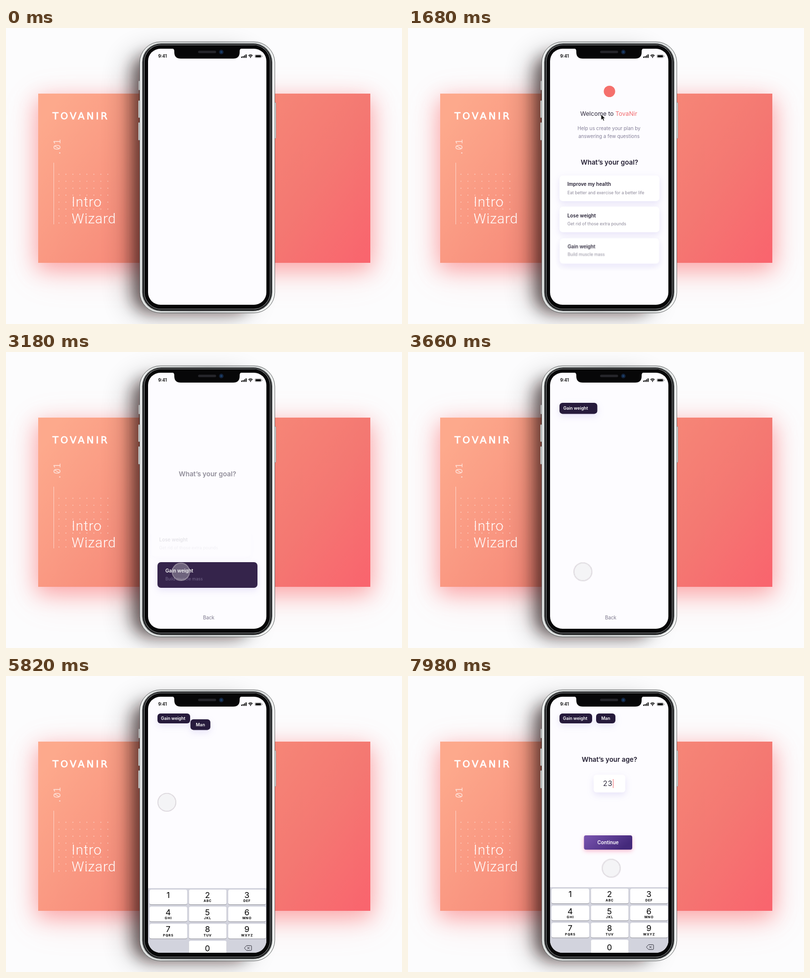
An HTML page that plays this animation: 800 px wide and 600 px high, repeating every 8 s.

```html
<!DOCTYPE html>
<html lang="en">
<head>
<meta charset="utf-8">
<title>Intro Wizard</title>
<style>
html, body { margin: 0; width: 100%; height: 100%; overflow: hidden; background: #fcfcfd; }
svg { display: block; width: 100%; height: 100%; }
text { font-family: Inter, Roboto, sans-serif; }
.mid { text-anchor: middle; }
.head { font-size: 13.4px; font-weight: 600; fill: #241f33; }
.bold { font-size: 9.85px; font-weight: 600; fill: #241f33; }
.sub { font-size: 8.6px; fill: #8b8798; }
.help { font-size: 9.8px; fill: #86819a; }
.box { fill: #fff; filter: drop-shadow(0 5px 7px rgba(105, 85, 210, .15)); }
.pop { transform-box: fill-box; transform-origin: center; }

.anim * { animation: 8s linear infinite both; }

/* welcome */
.anim .icon { animation-name: icon; }
.anim .welcome { animation-name: welcome; }
.anim .help { animation-name: help; }
.anim .goal { animation-name: goal; }
.anim .card1 { animation-name: card1; }
.anim .card2 { animation-name: card2; }
.anim .card3 { animation-name: card3; }
@keyframes icon {
  0%, 1.1% { opacity: 0; transform: scale(.6); animation-timing-function: ease-out; }
  6.2%, 34.5% { opacity: 1; transform: none; }
  37.5%, 100% { opacity: 0; transform: translateY(-14px); }
}
@keyframes welcome {
  0%, 3.1% { opacity: 0; transform: translateY(12px); animation-timing-function: ease-out; }
  8.8%, 34.7% { opacity: 1; transform: none; }
  38%, 100% { opacity: 0; transform: translateY(-14px); }
}
@keyframes help {
  0%, 5% { opacity: 0; transform: translateY(12px); animation-timing-function: ease-out; }
  10.8%, 35% { opacity: 1; transform: none; }
  38.4%, 100% { opacity: 0; transform: translateY(-14px); }
}
@keyframes goal {
  0%, 11.2% { opacity: 0; transform: translateY(12px); animation-timing-function: ease-out; }
  15.6%, 36.5% { opacity: 1; transform: none; animation-timing-function: ease-in-out; }
  43%, 100% { opacity: 0; transform: translateY(-50px); }
}
@keyframes card1 {
  0%, 12.8% { opacity: 0; transform: scale(.9); animation-timing-function: ease-out; }
  17.5%, 35% { opacity: 1; transform: none; }
  38.8%, 100% { opacity: 0; transform: translateX(-15px); }
}
@keyframes card2 {
  0%, 14.8% { opacity: 0; transform: scale(.9); animation-timing-function: ease-out; }
  19.5%, 36.3% { opacity: 1; transform: none; }
  40.2%, 100% { opacity: 0; transform: translateX(-14px); }
}
@keyframes card3 {
  0%, 16.8% { opacity: 0; transform: scale(.9); animation-timing-function: ease-out; }
  22%, 100% { opacity: 1; transform: none; }
}

/* chosen goal shrinks to a chip */
.anim .gain-box { animation-name: gain-box; }
.anim .gain-title { animation-name: gain-title; }
.anim .gain-sub { animation-name: gain-sub; }
.anim .back { animation-name: back; }
@keyframes gain-box {
  0%, 34.8% { x: 306px; y: 426px; width: 202px; height: 52px; rx: 7px; fill: #fff; }
  37.5%, 40% { x: 306px; y: 426px; width: 202px; height: 52px; rx: 7px; fill: #35244b; animation-timing-function: cubic-bezier(.5, 0, .2, 1); }
  48.5%, 100% { x: 306px; y: 76px; width: 66px; height: 20px; rx: 6px; fill: #261a3b; }
}
@keyframes gain-title {
  0%, 34.8% { transform: translate(322px, 446.5px) scale(1); fill: #241f33; }
  37.5%, 40% { transform: translate(322px, 446.5px) scale(1); fill: #fff; animation-timing-function: cubic-bezier(.5, 0, .2, 1); }
  48.5%, 100% { transform: translate(313px, 89px) scale(.877); fill: #fff; }
}
@keyframes gain-sub {
  0%, 34.8% { opacity: 1; fill: #8b8798; }
  37.5%, 40% { opacity: 1; fill: #75698c; }
  41.6%, 100% { opacity: 0; fill: #75698c; }
}
@keyframes back {
  0%, 36% { opacity: 0; }
  39%, 64.5% { opacity: 1; }
  67%, 100% { opacity: 0; }
}

/* gender */
.anim .ima { animation-name: ima; }
.anim .man { animation-name: man; }
.anim .woman { animation-name: woman; }
.anim .other { animation-name: other; }
.anim .man-box { animation-name: man-box; }
.anim .man-title { animation-name: man-title; }
@keyframes ima {
  0%, 47.2% { opacity: 0; transform: translateY(14px); animation-timing-function: ease-out; }
  51.5%, 64.2% { opacity: 1; transform: none; }
  68%, 100% { opacity: 0; transform: translateY(-18px); }
}
@keyframes man {
  0%, 48% { opacity: 0; transform: scale(.85); animation-timing-function: ease-out; }
  52%, 100% { opacity: 1; transform: none; }
}
@keyframes woman {
  0%, 49% { opacity: 0; transform: scale(.85); animation-timing-function: ease-out; }
  53%, 64.2% { opacity: 1; transform: none; }
  67.6%, 100% { opacity: 0; transform: translateX(-10px); }
}
@keyframes other {
  0%, 50% { opacity: 0; transform: scale(.85); animation-timing-function: ease-out; }
  54%, 64.8% { opacity: 1; transform: none; }
  68.3%, 100% { opacity: 0; transform: translateX(-10px); }
}
@keyframes man-box {
  0%, 63.4% { x: 303px; y: 199px; width: 52px; height: 37px; rx: 7px; fill: #fff; }
  65.5%, 66.9% { x: 303px; y: 199px; width: 52px; height: 37px; rx: 7px; fill: #35244b; animation-timing-function: cubic-bezier(.45, 0, .3, 1); }
  75.5%, 100% { x: 380px; y: 76px; width: 39px; height: 20px; rx: 6px; fill: #261a3b; }
}
@keyframes man-title {
  0%, 63.4% { transform: translate(329px, 220.7px) scale(1); fill: #241f33; }
  65.5%, 66.9% { transform: translate(329px, 220.7px) scale(1); fill: #fff; animation-timing-function: cubic-bezier(.45, 0, .3, 1); }
  75.5%, 100% { transform: translate(399.5px, 89px) scale(.877); fill: #fff; }
}

/* age */
.anim .keys { animation-name: keys; }
.anim .age { animation-name: age; }
.anim .field { animation-name: field; }
.anim .hint { animation-name: hint; }
.anim .two { animation-name: two; }
.anim .three { animation-name: three; }
.anim .caret { animation-name: caret; }
.anim .next { animation-name: next; }
@keyframes keys {
  0%, 64.5% { transform: translateY(138px); animation-timing-function: cubic-bezier(.3, 0, .1, 1); }
  74.5%, 100% { transform: none; }
}
@keyframes age {
  0%, 77% { opacity: 0; transform: translateY(14px); animation-timing-function: ease-out; }
  81.5%, 100% { opacity: 1; transform: none; }
}
@keyframes field {
  0%, 83% { opacity: 0; transform: translateY(2px) scale(.86); }
  88%, 100% { opacity: 1; transform: none; }
}
@keyframes hint { 0%, 89.39% { opacity: 1; } 89.4%, 100% { opacity: 0; } }
@keyframes two { 0%, 89.39% { opacity: 0; } 89.4%, 100% { opacity: 1; } }
@keyframes three { 0%, 94.09% { opacity: 0; } 94.1%, 100% { opacity: 1; } }
@keyframes caret {
  0%, 89.39% { opacity: 0; transform: translateX(-10px); }
  89.4%, 94.09% { opacity: 1; transform: translateX(-10px); }
  94.1%, 100% { opacity: 1; transform: none; }
}
@keyframes next {
  0%, 94.5% { opacity: 0; transform: translateY(10px); animation-timing-function: ease-out; }
  98.5%, 100% { opacity: 1; transform: none; }
}

/* pointer */
.anim .arrow { animation-name: arrow; }
.anim .touch { animation-name: touch; }
.anim .tx { animation-name: tx; }
.anim .ty { animation-name: ty; }
.anim .press { animation-name: press; }
@keyframes arrow {
  0%, 1.1% { transform: translate(274px, 44px); opacity: 1; animation-timing-function: cubic-bezier(.4, 0, .2, 1); }
  10%, 21.2% { transform: translate(390px, 175px); opacity: 1; animation-timing-function: cubic-bezier(.6, 0, .2, 1); }
  32%, 34% { transform: translate(352px, 444px); opacity: 1; }
  35%, 100% { transform: translate(352px, 444px); opacity: 0; }
}
@keyframes touch { 0%, 34.2% { opacity: 0; } 35.6%, 81.5% { opacity: 1; } 84%, 86% { opacity: .75; } 88%, 100% { opacity: 1; } }
@keyframes tx {
  0%, 58.1% { transform: translateX(353.3px); animation-timing-function: cubic-bezier(.65, 0, .35, 1); }
  63.1%, 66% { transform: translateX(329px); animation-timing-function: ease-in-out; }
  72%, 81.5% { transform: translateX(325px); animation-timing-function: cubic-bezier(.45, 0, .25, 1); }
  86.3%, 90.5% { transform: translateX(407px); animation-timing-function: ease-in-out; }
  93.4%, 95.6% { transform: translateX(460px); animation-timing-function: cubic-bezier(.5, 0, .65, .9); }
  100% { transform: translateX(410px); }
}
@keyframes ty {
  0%, 58.1% { transform: translateY(445.5px); animation-timing-function: cubic-bezier(.65, 0, .35, 1); }
  63.1%, 66% { transform: translateY(217px); animation-timing-function: ease-in-out; }
  72%, 81.5% { transform: translateY(256px); animation-timing-function: cubic-bezier(.65, 0, .35, 1); }
  86.3%, 95.6% { transform: translateY(443px); animation-timing-function: cubic-bezier(.5, 0, .65, .9); }
  100% { transform: translateY(389px); }
}
@keyframes press {
  0%, 34.2% { transform: scale(.5); }
  36%, 39.7% { transform: scale(.96); }
  43%, 63% { transform: none; }
  64% { transform: scale(.8); }
  65.5%, 88.4% { transform: none; }
  89.4% { transform: scale(.8); }
  90.4%, 93.4% { transform: none; }
  94.2% { transform: scale(.8); }
  95.2%, 100% { transform: none; }
}
</style>
</head>
<body>
<svg viewBox="0 0 800 600">
  <defs>
    <linearGradient id="coral" gradientUnits="userSpaceOnUse" x1="130" y1="110" x2="690" y2="515">
      <stop offset="0" stop-color="#fda98c"/><stop offset=".5" stop-color="#f68677"/><stop offset=".75" stop-color="#f47872"/><stop offset="1" stop-color="#f9656e"/>
    </linearGradient>
    <linearGradient id="steel" x2="1" y2=".1">
      <stop offset="0" stop-color="#f4f6f5"/><stop offset=".08" stop-color="#e3e6e5"/><stop offset=".5" stop-color="#c9cccc"/>
      <stop offset=".92" stop-color="#dfe2e2"/><stop offset="1" stop-color="#f4f6f5"/>
    </linearGradient>
    <linearGradient id="violet" x2="1" y2=".4">
      <stop offset="0" stop-color="#7a55b0"/><stop offset="1" stop-color="#44297b"/>
    </linearGradient>
    <filter id="glow" x="-25%" y="-50%" width="150%" height="200%"><feGaussianBlur stdDeviation="22"/></filter>
    <filter id="haze" x="-25%" y="-60%" width="150%" height="220%"><feGaussianBlur stdDeviation="36"/></filter>
    <filter id="shade" x="-40%" y="-20%" width="180%" height="140%"><feGaussianBlur stdDeviation="15"/></filter>
    <filter id="gloom" x="-60%" y="-30%" width="220%" height="160%"><feGaussianBlur stdDeviation="28"/></filter>
    <clipPath id="screen"><rect x="287" y="42" width="239" height="519" rx="25"/></clipPath>
  </defs>

  <rect width="800" height="600" fill="#fcfcfd"/>
  <rect x="65" y="152" width="671" height="343" fill="#fb8583" opacity=".26" filter="url(#haze)"/>
  <rect x="62" y="144" width="677" height="345" fill="#fb7479" opacity=".56" filter="url(#glow)"/>
  <rect x="65" y="133" width="671" height="343" fill="url(#coral)"/>
  <rect x="246" y="50" width="250" height="530" rx="40" fill="#180a08" opacity=".24" filter="url(#gloom)"/>
  <rect x="256" y="54" width="240" height="522" rx="36" fill="#180604" opacity=".56" filter="url(#shade)"/>

  <g fill="#fff">
    <text x="94" y="185" stroke="#fff" stroke-width=".8" style="font:19.5px 'DejaVu Sans',sans-serif;letter-spacing:4.1px">TOVANIR</text>
    <text transform="translate(109.5 259) rotate(-90)" opacity=".65" style="font:300 19px 'Noto Sans Mono',monospace">.01</text>
    <path d="M96.5 273V398" stroke="#fff" opacity=".55"/>
    <g id="dots" opacity=".5"></g>
    <g style="font-size:28px;font-weight:300;letter-spacing:.85px">
      <text x="132.5" y="362" style="font-family:Roboto,sans-serif">Intro</text>
      <text x="132.5" y="396" style="font-family:Roboto,sans-serif">Wizard</text>
    </g>
  </g>

  <!-- phone -->
  <g fill="#e6e9e8" stroke="#77797a" stroke-width=".6">
    <rect x="268" y="107" width="5" height="19" rx="1"/><rect x="267.6" y="147" width="5" height="35" rx="1"/>
    <rect x="267.6" y="191.5" width="5" height="36" rx="1"/><rect x="540.3" y="151" width="5" height="73" rx="1"/>
  </g>
  <path d="M269.5 182V191M269.5 126V147" stroke="#5a2418" stroke-width="2" opacity=".6"/>
  <rect x="270.2" y="28" width="272.8" height="549.5" rx="42" fill="url(#steel)" stroke="#55585a" stroke-width=".9"/>
  <rect x="274.8" y="31" width="263.4" height="543" rx="38.5" fill="#6b6e70"/>
  <rect x="276.2" y="32" width="260.6" height="541" rx="37.5" fill="#1f2021"/>
  <rect x="279" y="34" width="255" height="536" rx="34" fill="#aeb1b3"/>
  <rect x="279.8" y="34.8" width="253.4" height="534.4" rx="33" fill="#070708"/>
  <rect x="287" y="42" width="239" height="519" rx="25" fill="#fdfcff"/>

  <g clip-path="url(#screen)">
    <g class="anim">
      <circle class="pop icon" cx="407" cy="128.5" r="11.5" fill="#f5706c"/>
      <text class="welcome" x="348" y="177.5" style="font-size:12.1px" fill="#2d283b">Welcome to <tspan fill="#f2696c">TovaNir</tspan></text>
      <g class="help mid">
        <text x="406" y="207">Help us create your plan by</text>
        <text x="406" y="222.5">answering a few questions</text>
      </g>
      <text class="goal head mid" x="407" y="277">What’s your goal?</text>
      <g class="pop card1">
        <rect class="box" x="306" y="299" width="202" height="52" rx="7"/>
        <text class="bold" x="322" y="320">Improve my health</text>
        <text class="sub" x="322" y="337">Eat better and exercise for a better life</text>
      </g>
      <g class="pop card2">
        <rect class="box" x="306" y="362" width="202" height="52" rx="7"/>
        <text class="bold" x="322" y="383.5">Lose weight</text>
        <text class="sub" x="322" y="400">Get rid of those extra pounds</text>
      </g>
      <text class="back mid" x="409.5" y="542" style="font-size:9.9px" fill="#7d788d">Back</text>
      <g class="pop card3">
        <rect class="box gain-box"/>
        <text class="bold gain-title">Gain weight</text>
        <text class="sub gain-sub" x="322" y="462.5">Build muscle mass</text>
      </g>

      <text class="ima head mid" x="407" y="173.5">I’m a</text>
      <g class="pop woman mid">
        <rect class="box" x="365" y="199" width="71" height="37" rx="7"/>
        <text class="bold" x="400" y="220.7">Woman</text>
      </g>
      <g class="pop other mid">
        <rect class="box" x="444" y="199" width="63" height="37" rx="7"/>
        <text class="bold" x="474.5" y="220.7">Other</text>
      </g>
      <g class="pop man mid">
        <rect class="box man-box"/>
        <text class="bold man-title">Man</text>
      </g>

      <text class="age head mid" x="407" y="173.5">What’s your age?</text>
      <g class="pop field" style="font-size:14.2px" fill="#2d283b">
        <rect class="box" x="375" y="200" width="64" height="36" rx="6"/>
        <text class="hint mid" x="407" y="223" fill="#c9c6d2">18</text>
        <text class="two" x="394" y="223">2</text>
        <text class="three" x="403.8" y="223">3</text>
        <rect class="caret" x="414" y="209" width="1" height="18" fill="#f2696c"/>
      </g>
      <g class="next">
        <rect x="355.5" y="323" width="97.5" height="29" rx="4" fill="url(#violet)" style="filter:drop-shadow(0 3px 4px rgba(255,85,135,.4))"/>
        <text class="mid bold" x="404" y="341" style="fill:#fff">Continue</text>
      </g>
      <g class="keys" id="keys">
        <rect x="287" y="428" width="239" height="140" fill="#d2d3dd"/>
      </g>
      <path class="arrow" d="M0 0V11.5L2.7 9.1L4.6 13.3L6.7 12.4L4.9 8.2H8.4Z" fill="#111" stroke="#fff" stroke-width=".8"/>
      <g class="touch" id="touch"></g>
    </g>
  </g>

  <!-- notch and status bar -->
  <path d="M335 41Q340 42 340 47V49Q340 62 353 62H459Q472 62 472 49V47Q472 42 477 41Z" fill="#070708"/>
  <rect x="388" y="46" width="36.5" height="5" rx="2.5" fill="#25252a"/>
  <circle cx="435" cy="48.7" r="4.6" fill="#14233c"/><circle cx="435" cy="48.7" r="2.1" fill="#1b416c"/>
  <text x="307.5" y="60.2" style="font-size:8.7px;font-weight:600">9:41</text>
  <path d="M476 58V60.5M479 57V60.5M482 55.5V60.5M485 53.5V60.5" stroke="#000" stroke-width="2"/>
  <path d="M489.8 56.2Q494 52.2 498.2 56.2M491.5 58Q494 55.7 496.5 58" fill="none" stroke="#000" stroke-width="1.4"/>
  <circle cx="494" cy="59.6" r="1.1"/>
  <rect x="503" y="54.2" width="13" height="6" rx="1.6" fill="none" stroke="#777" stroke-width=".7"/>
  <rect x="504.1" y="55.2" width="10.8" height="4" rx=".8"/><rect x="516.8" y="56" width="1" height="2.4" rx=".5" fill="#777"/>
</svg>
<script>
const add = (id, html) => document.getElementById(id).insertAdjacentHTML('beforeend', html);

let dots = '';
for (let i = 0; i < 64; i++) {
  dots += `<circle cx="${107 + i % 8 * 14.1}" cy="${296.5 + (i >> 3) * 14.1}" r=".95"/>`;
}
add('dots', dots);

const letters = ['', 'ABC', 'DEF', 'GHI', 'JKL', 'MNO', 'PQRS', 'TUV', 'WXYZ'];
function key(digit, abc, col, row) {
  const x = 290 + col * 79.5, y = 431 + row * 34.6, mid = x + 38;
  return `<rect x="${x}" y="${y + 1}" width="76" height="30" rx="3.5" fill="#8f9098"/>
    <rect x="${x}" y="${y}" width="76" height="30" rx="3.5" fill="#fff"/>
    <text class="mid" x="${mid - .5}" y="${y + (digit ? 17 : 21)}" style="font-size:16.5px">${digit}</text>
    <text class="mid" x="${mid}" y="${y + 25.5}" style="font-size:6.5px;font-weight:700;letter-spacing:.9px">${abc}</text>`;
}
add('keys', letters.map((abc, i) => key(i + 1, abc, i % 3, i / 3 | 0)).join('') + key(0, '', 1, 3) +
  `<path d="M481.5 549.5L486 544.5H494.5Q496 544.5 496 546V553Q496 554.5 494.5 554.5H486ZM487.5 547.3L492 551.8M492 547.3L487.5 551.8"
    fill="none" stroke="#30303a" stroke-width="1"/>`);

// Motion blur: faint copies a few milliseconds apart
const copies = 6;
const share = a => 1 - (1 - a) ** (1 / copies);
let touch = '';
for (let i = 0; i < copies; i++) {
  const lag = `style="animation-delay:${-i * 3.5}ms"`;
  touch += `<g class="tx" ${lag}><g class="ty" ${lag}><circle class="press" r="18.2" stroke-width="1.8"
    fill="rgb(218,216,222)" fill-opacity="${share(.34)}" stroke="rgb(198,197,203)" stroke-opacity="${share(.58)}"/></g></g>`;
}
add('touch', touch);
</script>
</body>
</html>
```
